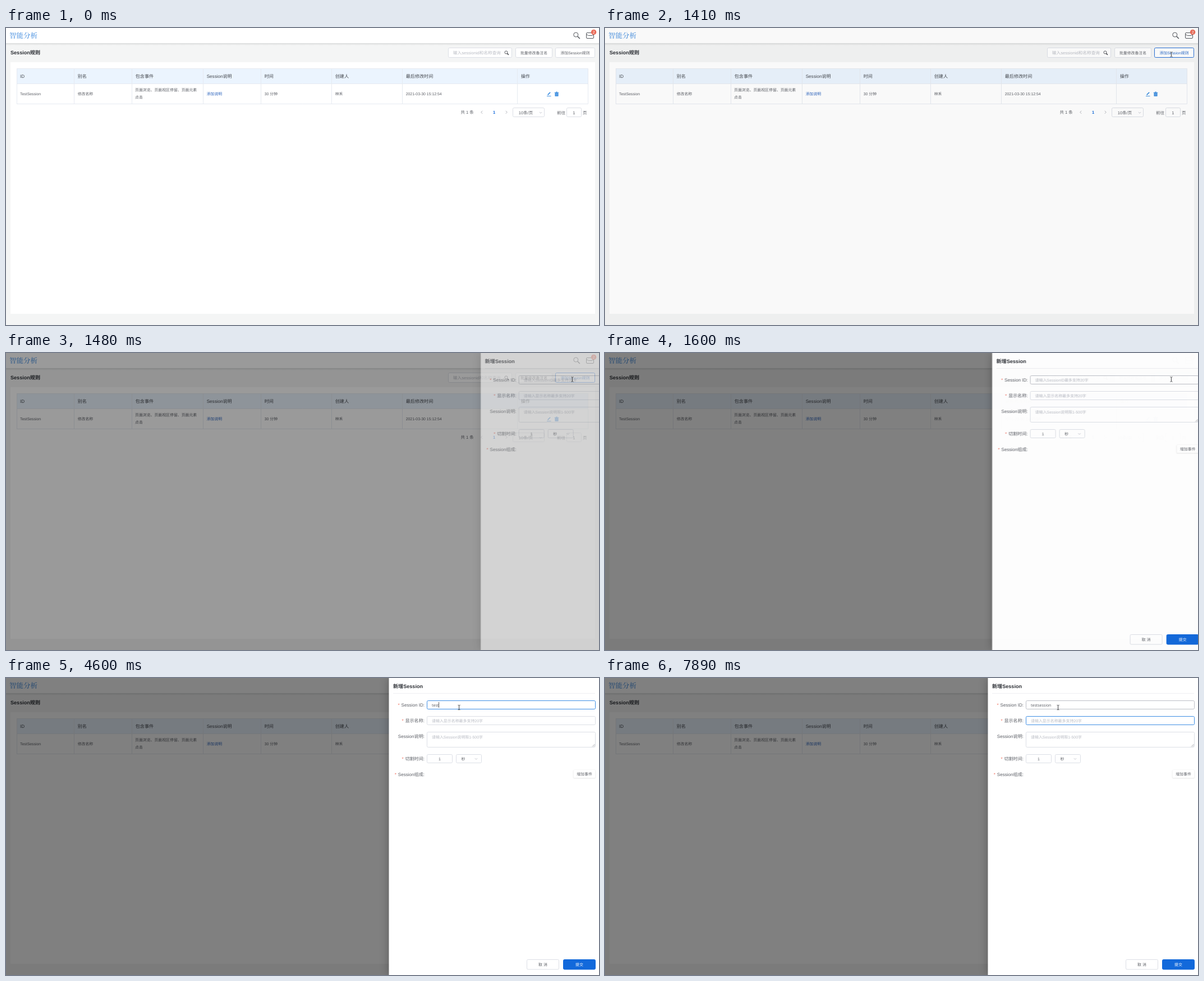
Recreate the animation shown at these times as an HTML page with a canvas. Size 1057 by 530 pixels, loop 8 s.

```html
<!DOCTYPE html>
<html lang="zh">
<head>
<meta charset="utf-8">
<title>Session规则</title>
<style>
html, body { margin: 0; width: 100%; height: 100%; overflow: hidden; background: #fff; }
canvas { display: block; width: 1057px; height: 530px; }
</style>
</head>
<body>
<canvas id="stage"></canvas>
<script>
const W = 1057, H = 530, LOOP = 8000;
const SANS = '"Liberation Sans", "Noto Sans CJK SC", "Noto Sans CJK", sans-serif';
const TYPED = '"Noto Sans", "Noto Sans CJK SC", sans-serif';
const SERIF = '"Noto Serif CJK SC", "Noto Serif SC", "Noto Serif", "Noto Sans CJK SC", serif';
const INK = '#5c5f66', HINT = '#b9bcc4', LINK = '#2b63bd', ICON = '#2f86dd', PRIMARY = '#1269db';
const EDGE = [220, 223, 230], EDGE_HOVER = [188, 191, 198], EDGE_FOCUS = [62, 142, 228];
const KEYS = [4090, 4190, 4390, 4600, 5220, 5600, 5910, 6140, 6300, 6480, 6710];
const FOCUS_ID = 2470, TAB = 7350, BLINK = 490;

const dpr = window.devicePixelRatio || 1;
function makeLayer(canvas) {
  canvas.width = W * dpr;
  canvas.height = H * dpr;
  const ctx = canvas.getContext('2d');
  ctx.scale(dpr, dpr);
  ctx.textRendering = 'geometricPrecision';
  return ctx;
}
const stage = makeLayer(document.getElementById('stage'));
const panel = makeLayer(document.createElement('canvas'));
let g = stage;

const clamp = v => Math.max(0, Math.min(1, v));
const span = (t, a, b) => clamp((t - a) / (b - a));
const smooth = p => p * p * (3 - 2 * p);
const easeOut = p => 1 - (1 - p) ** 3;
const mix = (a, b, p) => a + (b - a) * p;
const rgb = c => `rgb(${c.map(Math.round)})`;
const mixRgb = (a, b, p) => rgb(a.map((v, i) => mix(v, b[i], p)));

// CSS "ease", cubic-bezier(.25, .1, .25, 1)
function ease(x) {
  const curve = (u, a, b) => 3 * (1 - u) ** 2 * u * a + 3 * (1 - u) * u * u * b + u ** 3;
  let lo = 0, hi = 1;
  for (let i = 0; i < 24; i++) {
    const mid = (lo + hi) / 2;
    if (curve(mid, .25, .25) < x) lo = mid; else hi = mid;
  }
  return curve(lo, .1, 1);
}

function text(s, x, cy, size, color = INK, { align = 'left', weight = 400, font = SANS } = {}) {
  g.font = `${weight} ${size}px ${font}`;
  g.textAlign = align;
  g.fillStyle = color;
  g.fillText(s, x, cy + size * .37);
}
function rect(x, y, w, h, fill) {
  g.fillStyle = fill;
  g.fillRect(x, y, w, h);
}
function box(x, y, w, h, stroke = rgb(EDGE), fill = '#fff', r = 2) {
  g.beginPath();
  g.roundRect(x, y, w, h, r);
  g.fillStyle = fill;
  g.fill();
  g.strokeStyle = stroke;
  g.lineWidth = 1;
  g.stroke();
}
function line(color, width, ...pts) {
  g.beginPath();
  for (let i = 0; i < pts.length; i += 2) g.lineTo(pts[i], pts[i + 1]);
  g.strokeStyle = color;
  g.lineWidth = width;
  g.stroke();
}
function disc(x, y, r) {
  g.beginPath();
  g.arc(x, y, r, 0, Math.PI * 2);
}
function magnifier(x, y, r, color, width) {
  disc(x, y, r);
  g.strokeStyle = color;
  g.lineWidth = width;
  g.stroke();
  line(color, width * 1.6, x + r * .75, y + r * .75, x + r * 1.75, y + r * 1.75);
}
const chevronDown = (x, y) => line(HINT, .8, x - 2.2, y - 1, x, y + 1.2, x + 2.2, y - 1);

function drawTopBar() {
  const fade = g.createLinearGradient(0, 27, 0, 31);
  fade.addColorStop(0, '#d9dbdb');
  fade.addColorStop(1, '#f4f5f5');
  rect(0, 27, W, 4, fade);
  rect(0, 0, W, 27, '#fff');
  text('智能分析', 6, 13, 12.5, '#78ade8', { weight: 700, font: SERIF });
  magnifier(1015.8, 12, 4, '#55585e', 1);
  box(1034.5, 8.5, 13, 10, '#55585e', '#fff', 1.5);
  line('#55585e', 1, 1034.5, 11.5, 1038.5, 13.5, 1044, 13.5, 1048, 11.5);
  disc(1047.6, 7.4, 4.7);
  g.fillStyle = '#ea6a58';
  g.fill();
  text('2', 1047.6, 7.4, 7, '#fff', { align: 'center' });
}

function drawToolbar(hover) {
  text('Session规则', 8, 43.7, 9.1, '#2d3036', { weight: 700 });
  box(788.5, 35.5, 113, 17);
  text('输入sessionid和名称查询', 797, 44, 7.6, HINT);
  magnifier(891.5, 43.5, 2.5, '#44474d', .9);
  box(908.5, 35.5, 65, 17);
  text('批量修改备注名', 941, 44.2, 6.9, INK, { align: 'center' });
  box(979.5, 35.5, 70, 17, mixRgb(EDGE, [40, 112, 214], hover));
  text('添加Session规则', 1014.5, 44.2, 6.9, mixRgb([92, 95, 102], [40, 105, 200], hover), { align: 'center' });
}

function drawTable() {
  const cols = [19, 122, 225, 352, 455, 581, 707, 912];
  const heads = ['ID', '别名', '包含事件', 'Session说明', '时间', '创建人', '最后修改时间', '操作'];
  const cells = ['TestSession', '修改名称', '', '添加说明', '30 分钟', '林禾', '2021-03-30 15:12:54', ''];
  rect(19, 72, 1019, 27, '#ebf4fe');
  cols.forEach((x, i) => {
    line('#e6eaf1', 1, x + (i ? -.5 : .5), 72, x + (i ? -.5 : .5), 135);
    const tx = x + (i ? 5.7 : 6);
    text(heads[i], tx, 85.8, 8.1, '#45494f');
    text(cells[i], tx, 117, 6.9, i === 3 ? LINK : INK);
  });
  text('页面浏览、页面视区停留、页面元素', 230, 110.5, 6.9);
  text('点击', 230, 123.5, 6.9);
  line('#e6eaf1', 1, 19, 72.5, 1037.5, 72.5, 1037.5, 135.5, 19, 135.5);
  line('#e6eaf1', 1, 19, 99.5, 1038, 99.5);

  line(ICON, 1.5, 965.6, 119.4, 970.2, 114.8);
  line(ICON, .9, 964, 121.5, 971.5, 121.5);
  line(ICON, 1, 977.7, 115.4, 985.3, 115.4);
  line(ICON, 1, 980, 114.2, 983, 114.2);
  rect(978.5, 116.2, 6, 5.6, ICON);
  line('#bcd9f6', .6, 980.5, 117.2, 980.5, 120.8);
  line('#bcd9f6', .6, 982.5, 117.2, 982.5, 120.8);
}

function drawPager() {
  const mid = { align: 'center' };
  text('共 1 条', 810.5, 150.3, 7.5);
  line('#9da0a8', .8, 849.2, 147.8, 846.8, 150.3, 849.2, 152.8);
  text('1', 870, 150.3, 7.5, PRIMARY, { align: 'center', weight: 700 });
  line('#9da0a8', .8, 890.8, 147.8, 893.2, 150.3, 890.8, 152.8);
  box(903.5, 142.5, 56, 16);
  text('10条/页', 926.5, 151, 7.5, INK, mid);
  chevronDown(953, 151);
  text('前往', 982, 151, 7.5);
  box(999.5, 142.5, 26, 16);
  text('1', 1012.3, 151, 7.5, INK, mid);
  text('页', 1028, 151, 7.5);
}

function drawPage(t) {
  rect(0, 0, W, H, '#f4f5f5');
  drawTopBar();
  rect(8, 61, 1042, 449, '#fff');
  drawToolbar(smooth(span(t, 880, 1000)));
  drawTable();
  drawPager();
}

function label(s, cy, required = true) {
  text(s, 746, cy, 8.1, INK, { align: 'right' });
  if (required) text('*', 746 - g.measureText(s).width - 6, cy + .3, 8.1, '#f0705f');
}

function caretAt(t, x, cy, since) {
  if (Math.floor((t - since) / BLINK) % 2 === 0) rect(x, cy - 5, .8, 10, '#33363c');
}

function drawFields(t) {
  const tab = smooth(span(t, TAB, 7560));
  const idFocus = smooth(span(t, 2430, 2570)) * (1 - tab);
  const typed = 'testsession'.slice(0, KEYS.filter(k => k <= t).length);

  label('Session ID:', 48);
  box(750.5, 40.5, 300, 15, mixRgb(EDGE_HOVER, EDGE_FOCUS, idFocus));
  if (typed) text(typed, 759, 48.2, 6.95, INK, { font: TYPED });
  else text('请输入SessionID最多支持20字', 759, 48.2, 6.95, HINT);
  if (t >= FOCUS_ID && t < TAB) {
    g.font = `6.95px ${TYPED}`;
    const x = 759 + g.measureText(typed).width;
    caretAt(t, x, 48, typed ? KEYS[typed.length - 1] : FOCUS_ID);
  }

  label('显示名称:', 76);
  box(750.5, 68.5, 300, 15, mixRgb(EDGE, EDGE_FOCUS, tab));
  text('请输入显示名称最多支持20字', 759, 76.2, 6.95, HINT);
  if (t >= TAB + 50) caretAt(t, 759, 76, TAB + 50);

  label('Session说明:', 104, false);
  box(750.5, 96.5, 300, 27);
  text('请输入Session说明限1-500字', 759, 105.2, 6.95, HINT);
  line('#888b92', .7, 1045, 122.5, 1049.5, 118);
  line('#888b92', .7, 1047.5, 122.5, 1049.5, 120.5);

  label('切割时间:', 144);
  box(750.5, 136.5, 45, 15);
  text('1', 773, 144.2, 6.95, INK, { align: 'center' });
  box(802.5, 136.5, 45, 15);
  text('秒', 811.5, 144.2, 6.95);
  chevronDown(838, 144.2);

  label('Session组成:', 172);
}

function drawDrawer(t) {
  g.save();
  g.shadowColor = 'rgba(0,0,0,.3)';
  g.shadowBlur = 16 * dpr;
  rect(682.5, 0, 400, H, '#fff');
  g.restore();
  text('新增Session', 690, 15, 9.1, '#2d3036', { weight: 700 });
  line('#eeeff2', 1, 690, 27.5, 1050, 27.5);
  drawFields(t);

  g.save();
  g.shadowColor = 'rgba(0,0,0,.16)';
  g.shadowBlur = 2 * dpr;
  g.shadowOffsetY = .6 * dpr;
  g.beginPath();
  g.roundRect(1011.5, 164, 39, 14.5, 1.5);
  g.fillStyle = '#fff';
  g.fill();
  g.restore();
  text('增加事件', 1031, 171.7, 6.9, INK, { align: 'center' });

  box(928.5, 502.5, 57, 17.5);
  text('取 消', 957, 511.5, 6.95, INK, { align: 'center' });
  box(993.5, 502.5, 57, 17.5, PRIMARY, PRIMARY);
  text('提交', 1022, 511.5, 6.95, '#fff', { align: 'center' });
}

function pointerAt(t) {
  if (t < 830) {
    const p = smooth(span(t, 0, 830)), q = 1 - p;
    return [q * q * 52 + 2 * q * p * 900 + p * p * 1038, q * q * 530 + 2 * q * p * 330 + p * p * 60];
  }
  if (t < 1640) {
    const p = easeOut(span(t, 830, 1340));
    return [mix(1038, 1009.4, p), mix(60, 47, p)];
  }
  const p = smooth(span(t, 1640, 2440));
  return [mix(1009.4, 807.6, p), mix(47, 52.6, p)];
}

function drawPointer(t) {
  if (t < 20) return;
  const [x, y] = pointerAt(t);
  line('#2a2c30', .9, x, y - 3.6, x, y + 3.6);
  for (const s of [-1, 1]) line('#2a2c30', .8, x - 2, y + s * 4.3, x - .6, y + s * 4.1, x, y + s * 3.4, x + .6, y + s * 4.1, x + 2, y + s * 4.3);
}

function draw(t) {
  g = stage;
  drawPage(t);
  const open = ease(span(t, 1401, 1646));
  if (open > 0) {
    rect(0, 0, W, H, `rgba(0,0,0,${.5 * ease(span(t, 1401, 1564))})`);
    g = panel;
    g.clearRect(0, 0, W, H);
    drawDrawer(t);
    g = stage;
    g.globalAlpha = open;
    g.drawImage(panel.canvas, 375 * (1 - open), 0, W, H);
    g.globalAlpha = 1;
  }
  drawPointer(t);
}

const start = performance.now();
function tick() {
  draw((performance.now() - start) % LOOP);
  requestAnimationFrame(tick);
}
tick();
</script>
</body>
</html>
```
